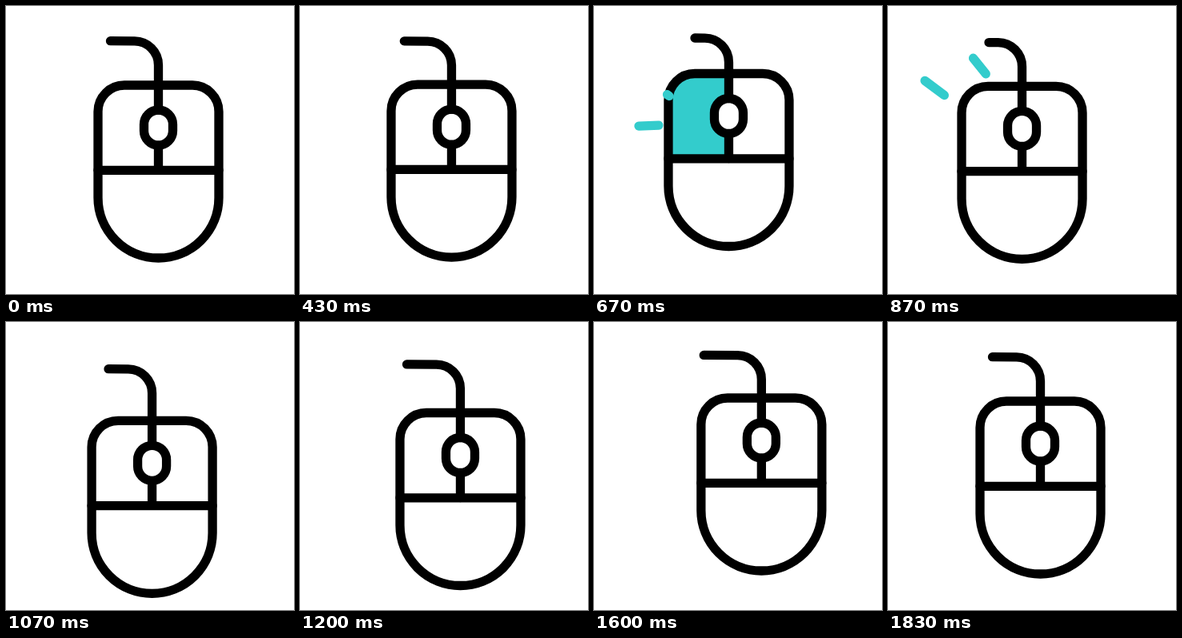
Animation of 360 by 360 pixels, one loop 2.5 s. Source, as an HTML page with a canvas:

```html
<!DOCTYPE html>
<html lang="en">
<head>
<meta charset="utf-8">
<title>Mouse click</title>
<style>
  html, body { margin: 0; width: 100%; height: 100%; overflow: hidden; background: #fff; }
  canvas { display: block; width: 360px; height: 360px; }
</style>
</head>
<body>
<canvas id="stage" width="360" height="360"></canvas>
<script>
const ctx = document.getElementById('stage').getContext('2d');
const LOOP = 2500;
const TEAL = '#33cccc';
const PRESS = [530, 780];

// time, body centre x, crossbar y, cable end x, cable end y
const PATH = [
  [400, 190.5, 205, 130.5, 43.7],
  [430, 189.5, 204.2, 130.3, 43.9],
  [670, 168.5, 190.5, 126, 40],
  [870, 167.5, 206.3, 126, 45.5],
  [1070, 182.5, 229.3, 128, 58.7],
  [1370, 220.2, 200, 141, 41.3],
  [1420, 221.5, 199.3, 142, 40.7],
  [1500, 218, 199.5, 140.5, 40.7],
  [1830, 190.5, 205, 130.5, 43.7]
];

// Rays start at (x, y) from the body, run along (dx, dy); the tail lags behind the head.
const RAYS = [
  { x: -74.5, y: -42, dx: -74, dy: 3, start: 535, end: 800, lag: 2.6 },
  { x: -74.5, y: -78, dx: -59, dy: -44, start: 660, end: 925, lag: 4.2 },
  { x: -32, y: -105, dx: -38.7, dy: -48.4, start: 710, end: 925, lag: 3.7 }
];

function tangent(i, c) {
  if (i === 0 || i === PATH.length - 1) return 0;
  const [a, b, d] = [PATH[i - 1], PATH[i], PATH[i + 1]];
  const before = b[0] - a[0], after = d[0] - b[0];
  return ((b[c] - a[c]) / before * after + (d[c] - b[c]) / after * before) / (before + after);
}

function pose(t) {
  const last = PATH.length - 1;
  if (t <= PATH[0][0]) return PATH[0].slice(1);
  if (t >= PATH[last][0]) return PATH[last].slice(1);
  const i = PATH.findIndex(key => key[0] > t) - 1;
  const a = PATH[i], b = PATH[i + 1];
  const span = b[0] - a[0], u = (t - a[0]) / span, v = 1 - u;
  return [1, 2, 3, 4].map(c =>
    a[c] * v * v * (1 + 2 * u) + b[c] * u * u * (3 - 2 * u) +
    span * u * v * (v * tangent(i, c) - u * tangent(i + 1, c)));
}

function line(x1, y1, x2, y2) {
  ctx.beginPath();
  ctx.moveTo(x1, y1);
  ctx.lineTo(x2, y2);
  ctx.stroke();
}

function drawBody(pressed) {
  if (pressed) {
    ctx.fillStyle = TEAL;
    ctx.beginPath();
    ctx.roundRect(-75.5, -106, 75.5, 106, [33, 0, 0, 0]);
    ctx.fill();
  }
  ctx.beginPath();
  ctx.roundRect(-75.5, -106, 151, 216, [33, 33, 75.5, 75.5]);
  ctx.stroke();
  line(-75.5, 0.3, 75.5, 0.3);
  line(0, -31, 0, 0);
  ctx.fillStyle = '#fff';
  ctx.beginPath();
  ctx.roundRect(-18, -75, 36, 44, 18);
  ctx.fill();
  ctx.stroke();
}

function drawCable(x, y, endX, endY) {
  ctx.beginPath();
  ctx.moveTo(endX, endY);
  ctx.arcTo(x, endY + 0.4, x, y - 75, 30);
  ctx.lineTo(x, y - 75);
  ctx.stroke();
}

function drawRay(ray, t) {
  const p = (t - ray.start) / (ray.end - ray.start);
  if (p <= 0 || p >= 1) return;
  const tail = p ** ray.lag;
  line(ray.x + ray.dx * tail, ray.y + ray.dy * tail, ray.x + ray.dx * p, ray.y + ray.dy * p);
}

function draw(t) {
  const [x, y, endX, endY] = pose(t);
  ctx.fillStyle = '#fff';
  ctx.fillRect(0, 0, 360, 360);
  ctx.lineCap = ctx.lineJoin = 'round';
  ctx.lineWidth = 11.3;
  ctx.strokeStyle = '#000';
  ctx.save();
  ctx.translate(x, y);
  drawBody(t >= PRESS[0] && t < PRESS[1]);
  ctx.restore();
  drawCable(x, y, endX, endY);
  ctx.save();
  ctx.translate(x, y);
  ctx.strokeStyle = TEAL;
  RAYS.forEach(ray => drawRay(ray, t));
  ctx.restore();
}

const begin = performance.now();
function tick() {
  draw((performance.now() - begin) % LOOP);
  requestAnimationFrame(tick);
}
tick();
</script>
</body>
</html>
```
